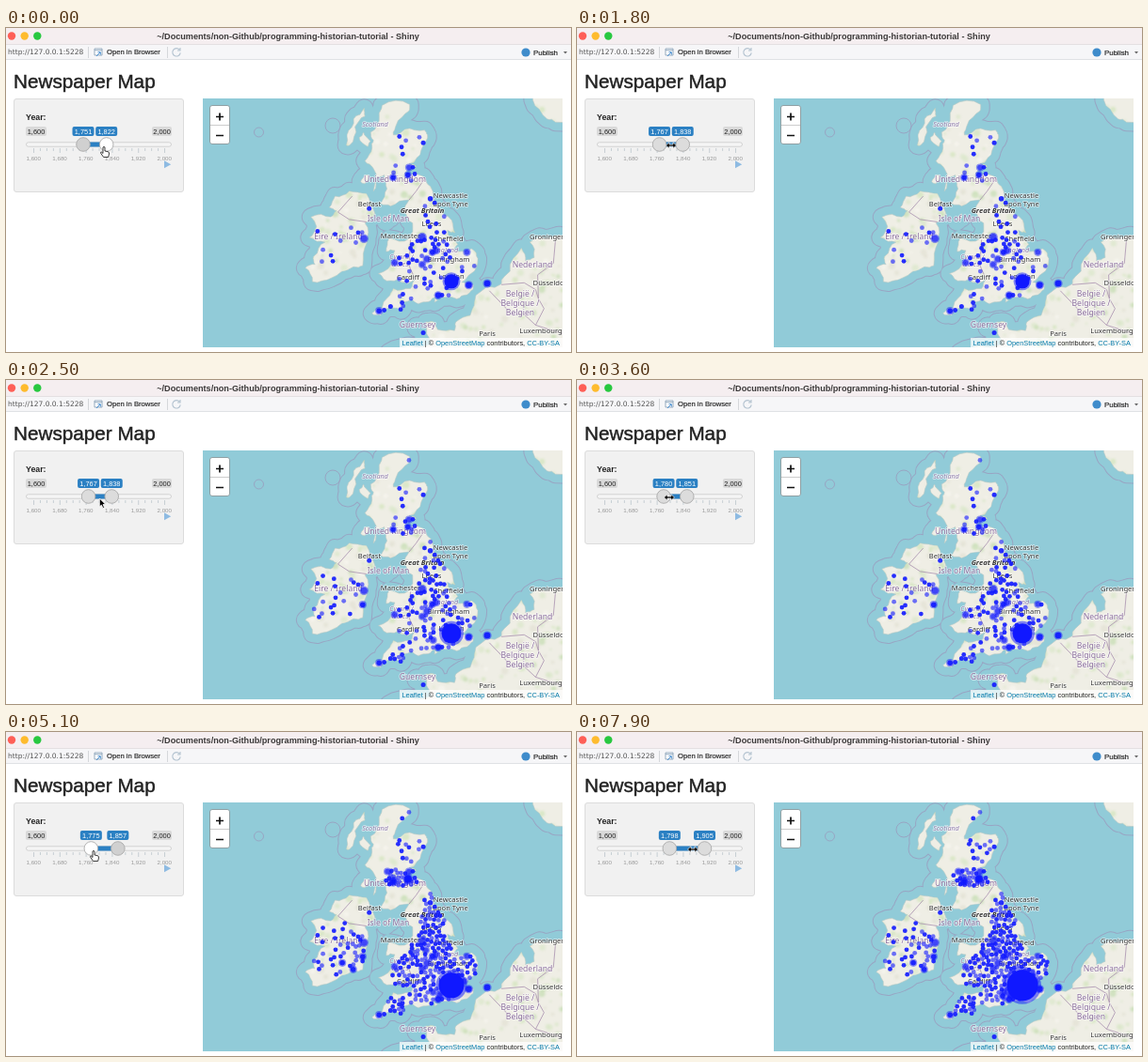
An HTML page that plays this animation: 600 px wide and 345 px high, repeating every 8 s.

```html
<!DOCTYPE html>
<html lang="en">
<head>
<meta charset="utf-8">
<title>Newspaper Map</title>
<style>
html, body { margin: 0; width: 100%; height: 100%; overflow: hidden; background: #fff; }
#stage { display: block; width: 600px; height: 345px; }
text { font-family: "Liberation Sans", Arial, sans-serif; fill: #222; white-space: pre; }
.mid text, text.mid { text-anchor: middle; }
.medium { stroke: #222; stroke-width: .022em; }
#labels text { font: 7.6px "Noto Sans", "Open Sans", sans-serif; fill: #333; text-anchor: middle;
  paint-order: stroke; stroke: #fff; stroke-opacity: .65; stroke-width: 1.6px; stroke-linejoin: round; }
#labels .land { font-size: 8.6px; fill: #8a6d9c; }
#labels .part { font-style: italic; font-size: 7.2px; fill: #8d7aa8; }
#labels .isle { font-style: italic; font-weight: 600; }
.grid text { font-size: 6.2px; fill: #999; }
.badge text { font-size: 7.4px; }
.link { fill: #0078a8; }
.cursor { stroke: #fff; stroke-width: .8; stroke-linejoin: round; }
</style>
</head>
<body>
<svg id="stage" viewBox="0 0 600 345">
  <defs>
    <path id="land"/>
    <clipPath id="landClip"><use href="#land"/></clipPath>
    <filter id="soft"><feGaussianBlur stdDeviation=".9"/></filter>
  </defs>
  <rect width="600" height="345" fill="#fff"/>

  <g id="chrome">
    <rect width="600" height="17" fill="#f5eef0"/>
    <rect y="17" width="600" height="16" fill="#f6f6f8"/>
    <path d="M0 17.5H600" stroke="#e4dfe1"/>
    <path d="M0 33.5H600" stroke="#dfe1e4"/>
    <circle cx="6" cy="8.5" r="4.2" fill="#fe5f57"/>
    <circle cx="19.7" cy="8.5" r="4.2" fill="#febb2e"/>
    <circle cx="33.3" cy="8.5" r="4.2" fill="#28c840"/>
    <text class="mid" x="299.5" y="11.8" font-size="9.12" font-weight="700" style="fill:#3a3838">~/Documents/non-Github/programming-historian-tutorial - Shiny</text>
    <text x="2" y="28.3" style="font:7.5px 'DejaVu Sans',sans-serif;fill:#555">http://127.0.0.1:5228</text>
    <path d="M87.5 20V32M171.5 20V32" stroke="#d5d7da"/>
    <path d="M94 22h8v7h-8zM94 23.7h8" fill="#fff" stroke="#8ba3b8" stroke-width=".9"/>
    <path d="M96 30l4-4M97.5 25.7h2.8v2.8" fill="none" stroke="#4a8fd0"/>
    <text class="medium" x="107" y="28.4" font-size="7.65">Open in Browser</text>
    <path d="M184.3 23.2a4.2 4.2 0 1 0 .9 3.2M185 21v3h-3" fill="none" stroke="#b4c3d0" stroke-width="1.1"/>
    <circle cx="552" cy="26" r="4.6" fill="#3f8ccb"/>
    <text class="medium" x="560" y="28.6" font-size="7.95">Publish</text>
    <path d="M592 25h4l-2 2.5z" fill="#666"/>
  </g>

  <text class="medium" x="8" y="64.3" font-size="20.7">Newspaper Map</text>

  <rect x="8.5" y="75.5" width="180" height="99" rx="2.5" fill="#f1f1f1" stroke="#dcdcdc"/>
  <text x="21" y="98.3" font-size="8.8" font-weight="700">Year:</text>
  <g class="badge mid">
    <rect x="21" y="105" width="22" height="10" rx="2" fill="#d9d9d9"/>
    <text x="32" y="112.6">1,600</text>
    <rect x="155" y="105" width="21" height="10" rx="2" fill="#d9d9d9"/>
    <text x="165.5" y="112.6">2,000</text>
  </g>
  <g id="grid" class="grid mid"></g>
  <rect x="21.5" y="121.8" width="154" height="4.4" rx="2.2" fill="#f5f5f5" stroke="#c9c9c9" stroke-width=".8"/>
  <rect id="bar" y="121.5" height="5" fill="#2b80c3"/>
  <g id="lo"></g>
  <g id="hi"></g>
  <path d="M168 141.3l7.2 4-7.2 4z" fill="#8ebbe2"/>

  <svg x="209" y="75" width="382" height="265" viewBox="209 75 382 265">
    <rect x="209" y="75" width="382" height="265" fill="#ddd"/>
    <g id="tiles">
      <rect x="209" y="75" width="382" height="265" fill="#91cbd8"/>
      <g stroke-linejoin="round">
        <use href="#land" stroke="#98a5c3" stroke-width="20"/>
        <use href="#land" stroke="#91cbd8" stroke-width="18"/>
      </g>
      <g fill="none" stroke="#98a5c3">
        <circle cx="268.5" cy="111" r="5"/>
        <circle cx="347" cy="104" r="8"/>
      </g>
      <use href="#land" fill="#efeee5" stroke="#b9c9c4" stroke-width=".6"/>
      <g clip-path="url(#landClip)">
        <g id="patches" filter="url(#soft)"></g>
        <path id="roads" fill="none" stroke="#dfa596" stroke-width=".8" opacity=".45"/>
        <path id="borders" fill="none" stroke="#a58bab" opacity=".75"/>
      </g>
      <g id="labels"></g>
    </g>
    <g id="dots" fill="#1018ff"></g>
    <rect x="418" y="330" width="173" height="10" fill="#fff" opacity=".72"/>
    <text x="420.5" y="337.8" font-size="7.4"><tspan class="link">Leaflet</tspan> | © <tspan class="link">OpenStreetMap</tspan> contributors, <tspan class="link">CC-BY-SA</tspan></text>
    <rect x="216.5" y="82.5" width="21" height="41" rx="2.5" fill="#fff" stroke="#8f9fa3"/>
    <path d="M217 103.5H237" stroke="#ccc"/>
    <path d="M223 94.5h8M227 90.5v8M223 114.5h8" stroke="#111" stroke-width="1.7"/>
  </svg>

  <g id="cursor">
    <path id="hand" class="cursor" fill="#fff" style="stroke:#111" d="M-1 .5q1-1.2 2 0v4l3 .6q1.8.5 1.5 2.4l-.9 3.5h-5l-3-4.3q-.3-1.4 1-1l1.4 1.3z"/>
    <path id="arrow" class="cursor" d="M0 0v9l2.1-1.900 1.5 3.4 1.6-.7-1.5-3.3h2.8z"/>
    <path id="resize" class="cursor" style="stroke-width:.7" d="M-5.500 0l3.5-3.3v2.3h4v-2.3l3.5 3.3-3.5 3.3v-2.3h-4v2.3z"/>
  </g>
</svg>

<script>
const LOOP = 8000;
const $ = id => document.getElementById(id);

function add(parent, tag, attrs, text) {
  const el = document.createElementNS('http://www.w3.org/2000/svg', tag);
  for (const k in attrs) el.setAttribute(k, attrs[k]);
  if (text) el.textContent = text;
  return parent.appendChild(el);
}

function seeded(s) {
  return () => (s = (s * 16807) % 2147483647) / 2147483647;
}
const rand = seeded(71);

// Web Mercator, longitude and latitude to stage pixels
const merc = lat => Math.log(Math.tan(Math.PI / 4 + lat * Math.PI / 360));
const project = (lon, lat) => [474.8 + 15.1 * lon, 270 - 865 * (merc(lat) - 1.0522)];
const parse = coords => coords.trim().split(/\s+/).map(p => project(...p.split(',').map(Number)));
const path = pts => 'M' + pts.map(p => p.map(v => v.toFixed(1)).join(' ')).join('L');

// Midpoint displacement turns a coarse outline into a rugged coast
function rugged(pts, depth = 2) {
  if (!depth) return pts;
  const finer = pts.flatMap(([x, y], i) => {
    const [nx, ny] = pts[(i + 1) % pts.length], k = (rand() - .5) * .32;
    return [[x, y], [(x + nx) / 2 - (ny - y) * k, (y + ny) / 2 + (nx - x) * k]];
  });
  return rugged(finer, depth - 1);
}

const coasts = {
  britain: `-5,58.6 -3.05,58.63 -3.1,58.4 -4,57.87 -4.2,57.5 -3.4,57.7 -2,57.68 -1.8,57.5 -2.1,57.1
    -2.75,56.45 -3.1,56.4 -2.6,56.27 -3.4,56 -2.6,56.05 -2,55.8 -1.6,55.5 -1.15,54.65 -.1,54.12
    .12,53.6 -.4,53.7 .34,53.1 .05,52.9 .4,52.8 1.3,52.92 1.74,52.5 1.25,51.85 .6,51.48 1.4,51.38
    1.4,51.15 .97,50.92 .25,50.74 -1.3,50.8 -1.95,50.6 -2.45,50.53 -2.95,50.72 -3.45,50.6 -3.65,50.22
    -4.8,50.25 -5.1,50 -5.7,50.08 -4.6,50.8 -4.2,51.2 -3,51.2 -2.65,51.6 -3.2,51.4 -3.9,51.6
    -4.9,51.62 -5.25,51.85 -4.1,52.4 -4.1,52.85 -4.7,52.8 -4.5,53.35 -3.1,53.35 -2.85,54 -3.6,54.5
    -3.1,54.95 -4.4,54.7 -5.1,54.8 -4.65,55.4 -4.85,55.95 -5.4,55.85 -5.6,55.3 -5.6,56.2 -6.2,56.5
    -5.7,57 -5.6,57.3 -5.8,57.6 -5.2,58.2`,
  ireland: `-5.5,54.4 -6.1,55.2 -7.3,55.3 -8.3,55.1 -8.7,54.65 -8.2,54.5 -8.6,54.25 -10,54.25 -9.6,53.85
    -10.1,53.4 -9,53.2 -9.8,52.6 -9.7,52.25 -10.4,52.1 -9.9,51.5 -8.6,51.65 -7,52.15 -6.35,52.2 -6.05,53.2
    -6.2,54`,
  continent: `-4.5,48.3 -2.7,48.55 -1.5,48.65 -1.9,49.7 -1.25,49.65 -1.1,49.35 .1,49.3 .2,49.7 1.2,50
    1.6,50.9 3.4,51.4 4,51.95 4.8,52.95 5.1,52.4 5.7,52.55 5.4,53.2 6.9,53.4 9,53.7 9,47.5 -4.5,47.5`,
  norway: '5.5,59.5 5.6,58.8 6.6,58.1 7.2,57.98 9,58.3 9,59.5',
  hebrides: '-6.25,58.5 -6.2,58.2 -6.9,57.8 -7.3,57.1 -7.5,57.1 -7.45,57.5 -7,58.1',
  skye: '-6.3,57.6 -5.8,57.25 -6,57.05 -6.6,57.4',
  islay: '-6.1,55.95 -5.9,55.9 -6.2,55.6 -6.5,55.7',
  man: '-4.4,54.4 -4.4,54.2 -4.75,54.05',
  wight: '-1.3,50.76 -1.08,50.68 -1.3,50.58',
  guernsey: '-2.6,49.5 -2.5,49.5 -2.6,49.42',
  jersey: '-2.2,49.25 -2,49.25 -2.1,49.17'
};
const landPath = Object.values(coasts).map(c => path(rugged(parse(c))) + 'Z').join('');
$('land').setAttribute('d', landPath);

$('borders').setAttribute('d', [
  '2.55,51.1 4.2,50 4.9,50.1 5.8,49.55 8,49.1',
  '3.4,51.37 5,51.45 5.8,51.15 6,50.75 6.4,50.3 5.8,49.55',
  '6,50.75 5.95,51.8 7.05,52.3 7.2,53.3',
  '-7.1,55.1 -8.1,54.45 -7.3,54.15 -6.1,54.05',
  '-3,53.3 -3.1,52.2 -2.7,51.65',
  '-2,55.8 -2.6,55.3 -3.1,54.95'
].map(c => path(parse(c))).join(''));

const tones = ['#cfe3b8', '#d9e6c8', '#f8f6f0', '#e2e1d3', '#c2dbae'];
for (let i = 0; i < 700; i++) {
  add($('patches'), 'circle', {
    cx: 315 + rand() * 276, cy: 75 + rand() * 265, r: .8 + rand() * 3,
    fill: tones[Math.floor(rand() * tones.length)], opacity: .65
  });
}

const labels = [
  ['Scotland', 392, 105, 'part'], ['United Kingdom', 413, 164, 'land'],
  ['Great Britain', 442, 197, 'isle'], ['Éire / Ireland', 353, 225, 'land'],
  ['Isle of Man', 406, 206, 'land'], ['Belfast', 386, 190], ['Newcastle', 472, 181],
  ['upon Tyne', 472, 190], ['Leeds', 452, 211], ['Sheffield', 470, 227],
  ['Manchester', 419, 224], ['England', 467, 239, 'part'], ['Cymru /', 420, 246, 'part'],
  ['Wales', 418, 254, 'part'], ['Birmingham', 470, 249], ['London', 473, 267],
  ['Cardiff', 427, 268], ['Guernsey', 437, 319, 'land'], ['Paris', 511, 328],
  ['Luxembourg', 568, 325], ['Nederland', 559, 255, 'land'], ['Düsseldorf', 579, 274],
  ['België /', 546, 286, 'land'], ['Belgique /', 546, 296, 'land'],
  ['Belgien', 546, 306, 'land'], ['Groningen', 575, 225]
];
for (const [text, x, y, kind] of labels) add($('labels'), 'text', { x, y, class: kind || 'town' }, text);

// Main towns as longitude, latitude and dot radius
const towns = [
  [-6.27, 53.35, 4], [-5.9, 54.6, 2.5], [-3.18, 55.95, 3.2], [-4.22, 55.85, 3.2], [-1.6, 55, 2.8],
  [-2.17, 53.42, 4], [-1.85, 52.48, 3.5], [-1.05, 50.9, 3.6], [1.1, 51.35, 3.8], [2.4, 51.42, 3.8],
  [-2.1, 49.2, 2.5], [-4.4, 50.4, 2.5], [-2.1, 57.2, 2.5]
].map(([lon, lat, r]) => [...project(lon, lat), r]);
const hubs = [...towns, ...parse('-.1,51.5 2.3,48.8 4.4,50.8 4.9,52.3 6.8,51.2')];
const gap = (a, b) => Math.hypot(a[0] - b[0], a[1] - b[1]);
$('roads').setAttribute('d', hubs.flatMap((a, i) =>
  hubs.slice(i + 1).filter(b => gap(a, b) < 78).map(b => path([a, b]))).join(''));

const layers = [0, 1, 2, 3].map(() => add($('dots'), 'g', {}));
const spin = seeded(1905);

function dot(level, cx, cy, r) {
  if (r > 3) add(layers[level], 'circle', { cx, cy, r: r + .8, opacity: .45 });
  add(layers[level], 'circle', { cx, cy, r: r > 3 ? r - .5 : r, opacity: spin() < .4 ? .6 : .9 });
}
for (const [x, y, r] of towns) {
  dot(0, x, y, r);
  if (r > 3 && r < 3.4) dot(2, x, y, r * 1.5);
}

// Areas of smaller places: centre, radii, count
const areas = [
  [353, 232, 29, 32, 42], [419, 155, 20, 10, 26], [430, 115, 15, 30, 14],
  [453, 196, 13, 24, 34], [451, 236, 22, 25, 84], [446, 274, 36, 16, 54],
  [408, 294, 16, 11, 16], [487, 254, 17, 18, 26], [422, 255, 14, 18, 14]
];
const hit = document.createElement('canvas').getContext('2d');
const land = new Path2D(landPath);
const placed = [...towns];
for (const [cx, cy, rx, ry, count] of areas) {
  for (let n = 0, tries = 0; n < count && tries < 2000; tries++) {
    const a = spin() * Math.PI * 2, d = Math.sqrt(spin());
    const p = [cx + Math.cos(a) * d * rx, cy + Math.sin(a) * d * ry];
    if (!hit.isPointInPath(land, ...p) || placed.some(q => gap(p, q) < 3.7)) continue;
    placed.push(p);
    const age = spin();
    dot([.25, .43, .92].filter(limit => age > limit).length, ...p, spin() < .05 ? 3.3 : 2.4);
    n++;
  }
}

// London grows with each layer
const london = project(-.12, 51.51);
layers.forEach((g, i) => {
  const [cx, cy] = london, r = 7.5 + i * 3;
  add(g, 'circle', { cx, cy, r: r + 2 + i * .5, opacity: .5 });
  add(g, 'circle', { cx, cy, r });
});

// Slider
const yearX = year => 82 + (year - 1751) * .3475;
const comma = year => Math.round(year).toLocaleString('en-US');
for (let i = 0; i <= 20; i++) {
  const year = 1600 + i * 20, x = yearX(year), major = i % 4 === 0;
  add($('grid'), 'path', { d: `M${x} 128v${major ? 5 : 3}`, stroke: '#b5c0c7', 'stroke-width': .7 });
  if (major) add($('grid'), 'text', { x: x - .3, y: 140.8 }, comma(year));
}

function makeHandle(id) {
  const g = $(id);
  g.setAttribute('class', 'badge mid');
  add(g, 'rect', { x: -11.5, y: 105, width: 23, height: 10, rx: 2, fill: '#2b80c3' });
  const label = add(g, 'text', { y: 112.7, style: 'fill:#fff' });
  const knob = add(g, 'circle', { cy: 124, r: 7.3, stroke: '#ababab', 'stroke-width': .9 });
  return (year, fill) => {
    g.setAttribute('transform', `translate(${yearX(year)})`);
    label.textContent = comma(year);
    knob.setAttribute('fill', fill);
  };
}
const setLo = makeHandle('lo'), setHi = makeHandle('hi');

// Start, end, then the shift of the low year, high year and cursor
const moves = [
  [0, 600, 0, 0, -9.5],
  [900, 1650, 16, 16, 5.5],
  [2400, 2900, 0, 0, -6.5],
  [3100, 3900, 19, 19, 6.5],
  [4400, 4550, 0, 0, -3],
  [4600, 5000, -11, 0, -4],
  [5200, 5800, -23, 0, -8],
  [5800, 6400, 0, 0, 22],
  [6650, 7400, 46, 48, 16]
];
const modes = [[0, 'hand'], [400, 'resize'], [2000, 'arrow'], [2800, 'resize'], [4450, 'hand'], [6100, 'resize']];
const redraws = [[-1000, 0], [2150, 1], [4190, 2], [6050, 2], [7600, 3]];
const tipY = { hand: 126.5, arrow: 126, resize: 125 };

const last = (keys, t) => keys.filter(k => k[0] <= t).pop();

function ease(t, start, end) {
  const u = Math.max(0, Math.min(1, (t - start) / (end - start)));
  return u * u * (3 - 2 * u);
}

function draw(t) {
  let lo = 1751, hi = 1822, x = 104;
  for (const [start, end, dLo, dHi, dx] of moves) {
    const u = ease(t, start, end);
    lo += dLo * u;
    hi += dHi * u;
    x += dx * u;
  }
  const hover = t < 250 ? 'hi' : t >= 4450 && t < 5950 ? 'lo' : '';
  const fill = id => !hover ? '#dcdcdc' : hover === id ? '#fff' : '#d0d0d0';
  setLo(lo, fill('lo'));
  setHi(hi, fill('hi'));
  $('bar').setAttribute('x', yearX(lo));
  $('bar').setAttribute('width', yearX(hi) - yearX(lo));

  const [start, level] = last(redraws, t);
  $('tiles').setAttribute('opacity', Math.min(1, (t - start) / 200));
  layers.forEach((g, i) => g.setAttribute('display', i <= level ? 'inline' : 'none'));

  const mode = last(modes, t)[1];
  for (const id in tipY) $(id).setAttribute('display', id === mode ? 'inline' : 'none');
  $('cursor').setAttribute('transform', `translate(${x} ${tipY[mode]})`);
}

const begin = performance.now();
function tick() {
  draw((performance.now() - begin) % LOOP);
  requestAnimationFrame(tick);
}
tick();
</script>
</body>
</html>
```
